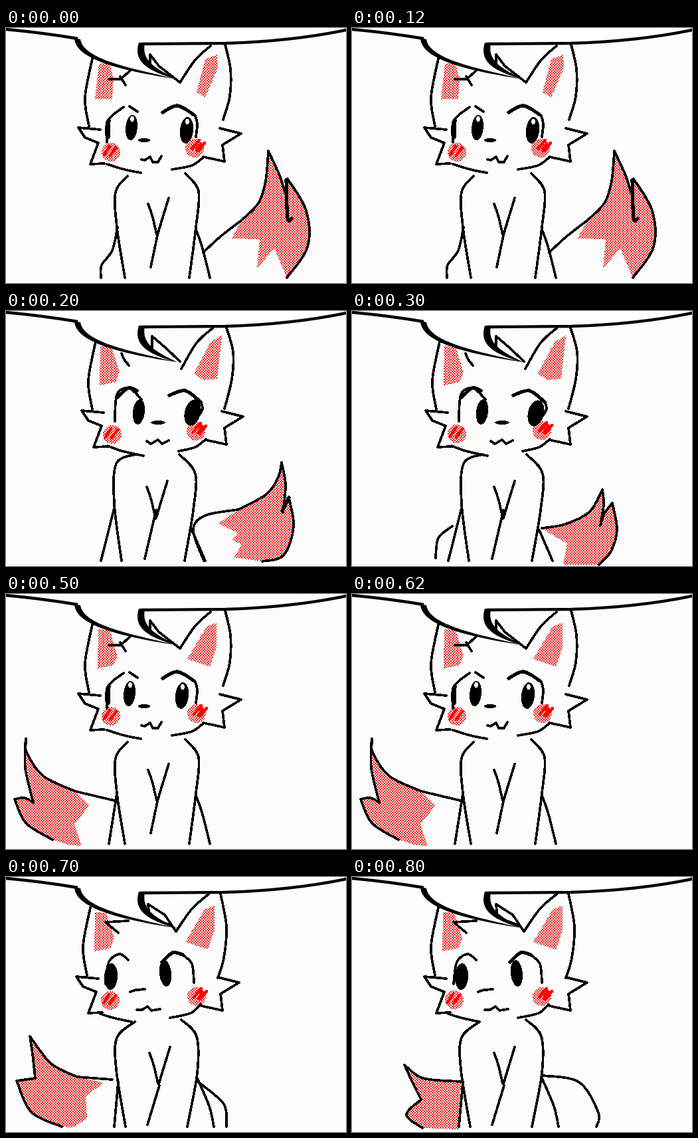
Recreate the animation shown at these times as an HTML page. Size 512 by 384 pixels, loop 1000 ms.

```html
<!DOCTYPE html>
<html lang="en">
<head>
<meta charset="utf-8">
<title>Tail wag</title>
<style>
html, body { margin: 0; width: 100%; height: 100%; overflow: hidden; background: #fcfcfc; }
svg { display: block; width: 512px; height: 384px; }
.pen { fill: none; stroke: #000; stroke-width: 3.7; stroke-linecap: round; stroke-linejoin: round; }
#fat { stroke-width: 5.2; }
#red { stroke: #f00; stroke-width: 4.6; }
</style>
</head>
<body>
<svg viewBox="0 0 512 384" shape-rendering="crispEdges">
  <defs>
    <pattern id="dots" width="4" height="4" patternUnits="userSpaceOnUse">
      <path d="M0 0h2v2h-2zM2 2h2v2h-2z" fill="#e41a1a"/>
    </pattern>
  </defs>
  <path id="tint" fill="url(#dots)"/>
  <path id="ink" class="pen"/>
  <path id="fat" class="pen"/>
  <path id="eyes"/>
  <path id="shine" fill="#fcfcfc"/>
  <path id="red" class="pen"/>
  <g shape-rendering="auto">
    <path d="M0 0H512V3Q430 24 330 23L204 24C196 45 206 62 256 76C170 60 110 45 108 16Q50 7 0 2Z" fill="#fff"/>
    <path d="M0 2Q55 7 108 16M203 24L330 23Q430 20 512 3" fill="none" stroke="#000" stroke-width="4.4"/>
    <path d="M103 15C104 42 150 61 258 77C185 60 117 47 112 17ZM200 22C193 45 203 63 258 77C216 58 205 45 209 23Z"/>
  </g>
</svg>
<script>
const set = (id, d) => document.getElementById(id).setAttribute('d', d);

// Smooth strokes through points; each "M" starts a new stroke.
function curve(text) {
  return text.split('M').slice(1).map(part => {
    const p = part.match(/\d+ \d+/g).map(s => s.split(' ').map(Number));
    let d = 'M' + p[0];
    for (let i = 0; i < p.length - 1; i++) {
      const a = p[i - 1] || p[i], b = p[i], c = p[i + 1], e = p[i + 2] || c;
      const near = b.map((v, k) => v + (c[k] - a[k]) / 6);
      const far = c.map((v, k) => v - (e[k] - b[k]) / 6);
      d += `C${near} ${far} ${c}`;
    }
    return d;
  }).join('');
}

const move = (text, dx, dy = 0) =>
  text.replace(/(-?\d+) (-?\d+)/g, (m, x, y) => `${+x + dx} ${+y + dy}`);

function oval([x, y], rx, ry = rx, turn = 0) {
  const a = turn * Math.PI / 180, dx = ry * Math.sin(a), dy = -ry * Math.cos(a);
  const arc = `A${rx} ${ry} ${turn} 1 1 `;
  return `M${x + dx} ${y + dy}${arc}${x - dx} ${y - dy}${arc}${x + dx} ${y + dy}Z`;
}

const leftEar = 'M131 46 120 105 126 148';
const leftFluff = 'M143 153 110 150 120 165 140 173 128 205 149 204';
const rightFluff = 'M297 194 329 201 326 176 354 159 322 151';
const chest = 'M214 265 220 282 227 311M245 256 237 282 228 312';
const leftPink = 'M139 53 156 54 168 93 162 107 138 112Z';
const widePink = 'M317 43 302 49 273 98 307 109 317 80Z';
const slimPink = 'M322 37 305 47 280 94 294 104 315 102Z';
const leftBlush = 'M-10 4 -2 -9M-1 5 8 -7';
const rightBlush = 'M-4 1 7 -12M3 3 9 -7M6 4 15 -8';

const tilted = {
  soft: 'M330 25 338 62 337 103 327 138M262 82 285 48 308 27M152 205 178 213 203 218M186 118 198 126M285 132 288 145 286 164M152 172 153 140 177 119',
  hard: 'M217 62 217 40 230 57 262 82M155 77 173 77 187 64M172 73 180 86M204 198 209 199 217 194 221 202 229 202 234 193',
  fat: 'M236 127 258 117 282 130M154 165 155 138',
  body: 'M183 223 165 247 167 300 179 376M270 219 290 246 286 300 276 376M228 312 218 360M286 303 296 332 307 376',
  chin: 'M250 213 280 207 297 195',
  nose: [208, 169], noseSize: [9, 3], left: [9, 19, 5], right: [10, 20, 6], glint: true
};

const upright = {
  soft: 'M329 25 339 62 337 103 326 147M261 87 284 48 308 26M150 203 172 211 204 218M171 64 175 73 182 82M161 166 164 126 182 116 201 133M290 136 293 147 288 157',
  hard: 'M217 62 217 38 238 56 259 76M209 196 215 200 226 194 232 200 242 195',
  fat: 'M165 130 181 116 194 120M243 127 267 120 290 137',
  body: 'M197 216 168 230 165 290 176 376M263 216 287 245 284 300 271 376M228 300 211 373M282 330 302 376M165 297 145 376',
  chin: 'M257 211 282 205 298 193',
  nose: [226, 168], noseSize: [11, 3], left: [9, 19, 7], right: [12, 20, 14]
};

const turned = {
  soft: 'M326 25 335 75 331 122 322 152M259 82 283 48 308 26M145 206 164 212 192 218M153 161 158 128 174 116 187 125M269 117 283 131 286 159',
  hard: 'M252 73 219 61 217 41 242 57 259 82M187 66 153 68 172 84M190 173 198 170 212 169M200 200 208 200 216 195 222 201 235 199',
  fat: 'M238 128 254 114 269 117',
  body: 'M192 218 165 242 164 290 178 376M262 215 285 240 286 295 271 376M229 314 211 373M286 303 304 345 311 376M167 308 161 376',
  chin: 'M250 212 281 205 296 192',
  nose: [202, 170], noseSize: [4, 2], left: [10, 20, 3], right: [9, 20, -6]
};

// One pose: look, head and body shift, pupils, cheeks, then the tail.
function pose(look, head, body, pupils, cheeks, tail) {
  const [l, r] = pupils, [cl, cr] = cheeks;
  const side = look === upright ? head + 1 : head - 1;
  const pinks = tail.pinks ||
    move(leftPink, look === turned ? head - 2 : head) +
    move(look === upright ? slimPink : widePink, head);
  const fur = curve(tail.edge).replace(/(?!^)M/g, 'L') + 'L' + tail.jag + 'Z';
  set('tint', pinks + fur + oval(cl, 14) + oval(cr, 14));
  set('ink', curve(move(look.soft + look.chin, head) + move(leftEar, side) +
    move(look.body + chest, body) + tail.base + tail.edge) +
    move(look.hard, head) + move(leftFluff, side) + move(rightFluff, head));
  set('fat', curve(move(look.fat, head) + (tail.notch || '')));
  set('eyes', oval(l, ...look.left) + oval(r, ...look.right) +
    oval([look.nose[0] + head, look.nose[1]], ...look.noseSize));
  set('shine', look.glint ? pupils.map(([x, y]) => oval([x + 1, y - 13], 3, 4)).join('') : '');
  set('red', move(leftBlush, ...cl) + move(rightBlush, ...cr));
}

const highRight = () => pose(tilted, 0, 0, [[189, 150], [272, 154]], [[158, 187], [284, 181]], {
  pinks: 'M140 54 155 52 162 75 160 107 134 107ZM318 40 300 47 287 97 300 104 319 60Z',
  base: 'M168 300 160 335 144 357 143 376M297 338 323 314 354 290',
  edge: 'M354 290 380 264 391 230 395 185M395 185 412 222 420 248M424 227 452 275 454 330 423 376',
  notch: 'M422 229 424 286 430 287',
  jag: '404 332 378 362 382 318 340 317'
});

const midRight = () => pose(upright, 3, -2, [[200, 152], [281, 153]], [[160, 186], [286, 181]], {
  base: 'M298 376 282 330 300 308 350 299',
  edge: 'M350 299 392 276 410 250 415 228M415 228 421 262 417 303M426 281 433 325 418 368 386 377',
  notch: 'M416 301 426 281',
  jag: '343 371 355 352 341 345 350 335 320 320'
});

const lowRight = () => pose(upright, 0, 0, [[196, 152], [277, 154]], [[158, 185], [286, 180]], {
  base: 'M151 324 130 342 126 372',
  edge: 'M286 327 321 321 358 302 377 269M377 269 379 291 374 323M374 323 380 305 392 289M392 289 399 329 390 362 372 382',
  jag: '318 382 324 350 293 332'
});

const highLeft = () => pose(tilted, 0, 0, [[186, 150], [265, 153]], [[158, 184], [287, 180]], {
  base: 'M167 300 155 376M163 311 104 297',
  edge: 'M104 297 56 274 31 238 30 218M30 222 29 262 41 314M41 314 28 307 13 309M13 309 30 345 70 370',
  jag: '94 378 114 379 103 347 126 318'
});

const midLeft = () => pose(turned, -3, 2, [[158, 150], [240, 145]], [[157, 186], [287, 180]], {
  base: 'M290 309 328 342 332 376M160 305 107 301',
  edge: 'M107 301 68 281 36 240M36 240 40 267 44 303M44 303 16 307M16 307 38 354 84 376',
  jag: '100 377 122 364 120 330 147 310'
});

const lowLeft = () => pose(turned, 0, 0, [[165, 150], [248, 145]], [[154, 185], [286, 180]], {
  base: 'M288 299 342 309 371 355 368 376',
  edge: 'M164 308 107 303 79 283M79 283 90 307 104 335M104 335 82 358 106 378',
  jag: '161 380'
});

const steps = [[0, highRight], [200, midRight], [300, lowRight], [500, highLeft], [700, midLeft], [800, lowLeft]];
let shown;

function tick() {
  const t = performance.now() % 1000;
  const [, draw] = steps.filter(([at]) => at <= t).pop();
  if (draw !== shown) draw();
  shown = draw;
  requestAnimationFrame(tick);
}
tick();
</script>
</body>
</html>
```
